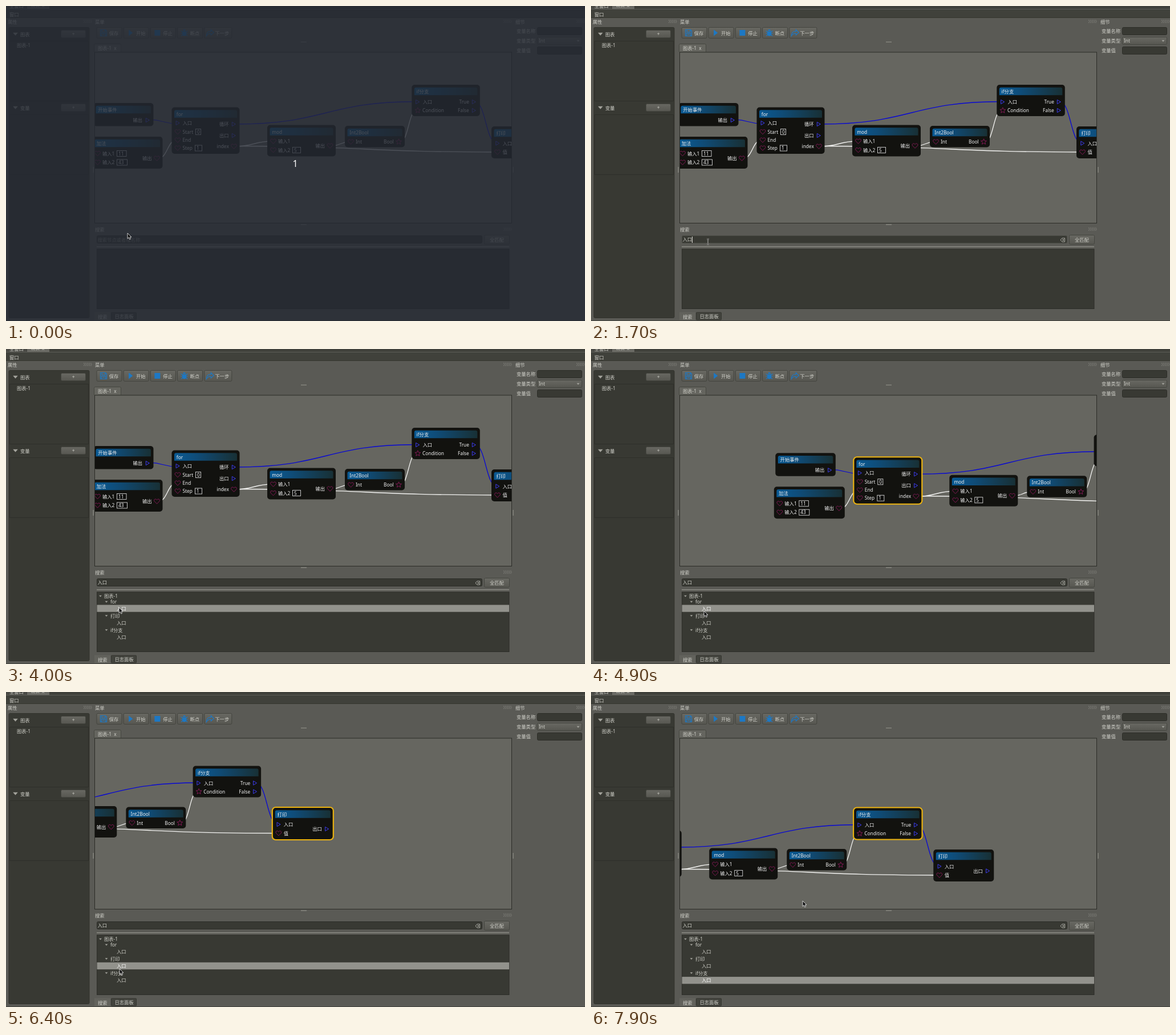
Write an HTML page that moves like this. It is 1015 px wide and 552 px high and loops after 8 s.

```html
<!DOCTYPE html>
<html lang="zh-CN">
<head>
<meta charset="utf-8">
<title>节点编辑器搜索</title>
<style>
html, body { margin: 0; width: 100%; height: 100%; overflow: hidden; background: #5a5a55; }
svg { display: block; width: 100vw; height: 100vh; }
text { font: 8.3px "Noto Sans", "Noto Sans CJK SC", "Noto Sans CJK", sans-serif; white-space: pre; }
</style>
</head>
<body>
<svg id="stage" viewBox="0 0 1015 552" xmlns="http://www.w3.org/2000/svg"></svg>
<script>
const UI = '#d2d2cb', DARK = '#383933', EDGE = '#2c2d28', ICON = '#1d78c4';

// y is the middle of the line of text
const text = (x, y, str, fill = UI, extra = '') =>
  `<text x="${x}" y="${y + 3}" fill="${fill}" ${extra}>${str}</text>`;
const rect = (x, y, w, h, fill, stroke = 'none', r = 0, extra = '') =>
  `<rect x="${x}" y="${y}" width="${w}" height="${h}" rx="${r}" fill="${fill}" stroke="${stroke}" ${extra}/>`;
const path = (d, fill, stroke = 'none', width = 1, extra = '') =>
  `<path d="${d}" fill="${fill}" stroke="${stroke}" stroke-width="${width}" ${extra}/>`;
const at = (x, y, body) => `<g transform="translate(${x} ${y})">${body}</g>`;

const button = (x, y, w, h) => rect(x + .5, y + .5, w - 1, h - 1, 'url(#btn)', '#44453f', 2);
const field = (x, y, w, h) => rect(x + .5, y + .5, w - 1, h - 1, DARK, EDGE, 2);
const arrowDown = (x, y, r, fill = '#a3a39c') =>
  path(`M${x - r} ${y - r / 2}h${2 * r}l${-r} ${r * 1.15}z`, fill);
const grip = x => [25, 27, 29].map((y, i) =>
  path(`M${x + i % 2} ${y}h14`, 'none', '#8b8b84', .9, 'stroke-dasharray="1.6 1.4"')).join('');

// Node graph ------------------------------------------------------------

const starPath = 'M' + Array.from({ length: 10 }, (_, i) => {
  const r = i % 2 ? 2.3 : 5.2, a = i * Math.PI / 5 - Math.PI / 2;
  return `${(r * Math.cos(a)).toFixed(2)} ${(r * Math.sin(a)).toFixed(2)}`;
}).join('L') + 'Z';
const marks = {
  run: path('M-2.7 -3.6L3.3 0L-2.7 3.6Z', 'none', '#3c3cf0', 1),
  heart: path('M0 4.3L-4.4 -.2C-5.7 -2.2 -4.2 -4 -2.5 -4C-1.2 -4 -.4 -3.2 0 -2.3C.4 -3.2 1.2 -4 2.5 -4C4.2 -4 5.7 -2.2 4.4 -.2Z', 'none', '#8d1a5c', .9),
  star: path(starPath, 'none', '#8d1a5c', .9)
};

// x, y, width, height, title, ports: [mark, x, y, label, label x, value, value x, value width]
const nodes = {
  start: [153, 170, 105.5, 40.5, '开始事件', [['run', 248, 200, '输出', 222.5]]],
  add: [150.5, 229, 124, 56, '加法', [
    ['heart', 160.5, 258.5, '输入1', 169, '11', 194, 17.5],
    ['heart', 160.5, 274, '输入2', 169, '43', 194, 19],
    ['heart', 264.5, 267, '输出', 239]]],
  loop: [290.5, 177.5, 119, 81.5, 'for', [
    ['run', 300.8, 205, '入口', 309.5], ['heart', 301, 220.5, 'Start', 309.5, '0', 332, 10],
    ['heart', 301, 235, 'End', 309.5], ['heart', 301, 249, 'Step', 309.5, '1', 331, 13],
    ['run', 399, 207, '循环', 374], ['run', 399, 227, '出口', 374], ['heart', 399.5, 246, 'index', 369.5]]],
  mod: [458, 208.5, 120, 55, 'mod', [
    ['heart', 468.5, 237, '输入1', 477],
    ['heart', 468.5, 252.5, '输入2', 477, '5', 502, 15],
    ['heart', 568, 245, '输出', 542.5]]],
  cast: [594, 210, 105, 37.5, 'Int2Bool', [['heart', 604.5, 238, 'Int', 613], ['star', 688.5, 238, 'Bool', 662]]],
  branch: [711.3, 138, 119.5, 55, 'if分支', [
    ['run', 721.3, 168, '入口', 730.5], ['star', 721.8, 183, 'Condition', 730],
    ['run', 820, 168, 'True', 794.5], ['run', 820, 183, 'False', 792]]],
  print: [851, 211, 106, 56, '打印', [
    ['run', 861.5, 240.5, '入口', 870.5], ['heart', 861.5, 256, '值', 870.5],
    ['run', 946, 248.5, '出口', 921]]]
};

const port = ([mark, x, y, label, lx, value, vx, vw]) =>
  at(x, y, marks[mark]) + text(lx, y, label, '#f2f2f2') +
  (value ? rect(vx + .5, y - 5, vw - 1, 10, '#0c0c0a', '#d8d8d8', 0, 'stroke-width=".9"') + text(vx + 3, y, value, '#f2f2f2') : '');
const node = ([x, y, w, h, title, ports]) =>
  rect(x, y, w, h, '#12120f', 'none', 5) +
  path(`M${x + 4.5} ${y + 18.2}v-10.5q0 -3 3 -3h${w - 15}q3 0 3 3v10.5z`, 'url(#head)') +
  text(x + 8.3, y + 12.2, title, '#f2f2f2') + ports.map(port).join('');

const wire = (x1, y1, x2, y2, color = '#f2f2f0') => {
  const mid = (x1 + x2) / 2;
  return path(`M${x1} ${y1}C${mid} ${y1} ${mid} ${y2} ${x2} ${y2}`, 'none', color, 1.3);
};
const BLUE = '#0808d4';
const wires = wire(250, 199, 299, 206, BLUE) + wire(402, 207, 720, 167.5, BLUE) +
  wire(822, 168, 860, 240, BLUE) + wire(267, 267, 299, 235) + wire(402, 246, 467, 237) +
  wire(402, 245.5, 860, 256) + wire(571, 245, 602, 238) + wire(691, 238, 720, 183);

// Window parts ----------------------------------------------------------

const defs = `<defs>
<linearGradient id="btn" x2="0" y2="1"><stop stop-color="#686862"/><stop offset="1" stop-color="#575751"/></linearGradient>
<linearGradient id="head"><stop stop-color="#0a5a94"/><stop offset=".35" stop-color="#0f4c78"/><stop offset="1" stop-color="#183035"/></linearGradient>
<clipPath id="view"><rect x="156" y="82" width="730" height="298"/></clipPath></defs>`;

const topBar = rect(0, 0, 1015, 21, '#40413b') + rect(0, 0, 36, 5, '#4a4a45') + rect(37, 0, 39, 5.5, '#6a6a64') +
  text(6, 0, '主窗口') + text(44, -1, 'test  x') + rect(0, 5, 1015, 1, '#5e5e58') + rect(0, 20, 1015, 1, '#35362f') +
  text(6, 14.5, '窗口');

const section = (y, name) => arrowDown(16.5, y, 4.3) + text(25, y + .5, name) + button(96, y - 7, 44, 14) +
  text(118, y, '+', UI, 'text-anchor="middle"') + rect(6.5, y + 12.5, 138, 105, DARK, '#2e2f2a');
const leftDock = text(3, 27.5, '属性') + grip(136) + rect(5, 37.5, 141, 509, DARK, '#32332d', 2) +
  section(49, '图表') + text(19, 69, '图表-1') + section(178, '变量');

const icons = [
  path('M-5.5 -5.5h9l2 2v9h-11z M-3 -5.5v4h6v-4 M-3.5 5.5v-5h7v5 M-2 2.5h4', 'none', ICON, 1.2),
  path('M-3 -5.5L4 0L-3 5.5Z', ICON),
  rect(-5, -5, 10, 10, ICON),
  path('M-2.5 -3.5a2.5 2.5 0 0 1 5 0z M-3.5 -2.6h7v4.6a3.5 3.5 0 0 1 -7 0z', ICON) +
    path('M-6 -3.5l3 2M6 -3.5l-3 2M-6.5 1h13M-5.5 5.5l3 -2.5M5.5 5.5l-3 -2.5', 'none', ICON, 1.2),
  path('M-6 5.5C-6 -1 -2 -3 2 -2.5V-5.5L7 -.5L2 4V1.2C-2 .5 -4 2 -6 5.5Z', 'none', ICON, 1.2)
];
const tools = ['保存', '开始', '停止', '断点', '下一步'].map((name, i) => {
  const x = 158.5 + 47.2 * i;
  return button(x, 37, i == 4 ? 49 : 45, 20) + at(x + (i == 4 ? 10 : 12.5), 47, icons[i]) +
    text(x + (i == 4 ? 19 : 22.3), 47.5, name);
}).join('');

const handles = rect(517, 62.5, 10, 1.2, '#8e8e87') + rect(517, 382.5, 10, 1.2, '#8e8e87') +
  rect(152.5, 282, 1.2, 10, '#8e8e87') + rect(888.5, 282, 1.2, 10, '#8e8e87');

const centre = text(156, 27.5, '菜单') + grip(872) + tools + handles +
  path('M154.5 80.5v-12q0 -2 2 -2h43q2 0 2 2v12', '#65655f', '#45463f') + text(161, 73.5, '图表-1  x') +
  rect(155.5, 81, 731, 299.5, '#666660', '#2b2c27');

const rightDock = text(893, 27.5, '细节') + grip(1000) +
  ['变量名称', '变量类型', '变量值'].map((s, i) => text(895, 44.3 + 17 * i, s)).join('') +
  field(931, 37, 79, 14) + button(931, 54, 79, 14) + field(931, 71, 79, 14) +
  text(934, 61, 'Int') + arrowDown(1003, 61, 2.6);

const searchDock = text(156, 391.5, '搜索') + at(0, 364, grip(872)) +
  rect(159.5, 402.5, 675, 13, DARK, EDGE, 2, 'id="box"') + button(838, 401, 45, 17) + text(848, 409.5, '全匹配') +
  rect(159, 421, 723, 1.5, '#8a8a83') + rect(159.5, 426, 722.5, 104.5, DARK, EDGE) +
  path('M155 536.5h28v14h-28z', '#62625c') + text(161, 544.5, '搜索') +
  rect(184.5, 537, 44, 13, '#42433d', '#34352f', 1) + text(190.5, 544, '日志面板') + rect(0, 551, 1015, 1, '#42433d');

const ROWS = [454.6, 480, 505.3];
const tree = `<g id="tree">` + rect(159.5, 0, 722.5, 12.3, '#92928c', 'none', 0, 'id="sel"') +
  arrowDown(165.5, 433, 2.4) + text(172, 433, '图表-1') +
  [[443, 'for'], [467.5, '打印'], [492.5, 'if分支']].map(([y, s]) => arrowDown(176, y, 2.4) + text(183, y, s)).join('') +
  ROWS.map(y => text(194, y, '入口', UI, 'class="hit"')).join('') + '</g>';

const entry = text(160.5, 409.5, '搜索节点或者槽名称', '#8d8d86', 'id="hint"') +
  text(160.5, 409.3, '入口', UI, 'id="query"') + rect(177, 404, 1, 11, '#e4e4de', 'none', 0, 'id="caret"') +
  `<g id="clear">${path('M823 410l2.8 -3.2h4.8v6.4h-4.8z M826.5 408.3l2.8 3.4m0 -3.4l-2.8 3.4', 'none', '#c4c4bd', .8)}</g>`;

const overlay = `<g id="shade">${rect(0, 0, 1015, 552, '#242932', 'none', 0, 'opacity=".8"')}
<text x="507" y="282" fill="#fff" text-anchor="middle" style="font-size:16px">1</text></g>`;

const pointers = `<g id="arrow">${path('M0 0V9.6L2.2 7.6L3.8 11L5.5 10.2L4 7H7Z', '#111', '#f4f4f4', .8)}</g>` +
  `<g id="beam">${path('M-2 -4.5q2 0 2 1q0 -1 2 -1M0 -3.5v7M-2 4.5q2 0 2 -1q0 1 2 1', 'none', '#e0e0da', 1.8)}${
    path('M-2 -4.5q2 0 2 1q0 -1 2 -1M0 -3.5v7M-2 4.5q2 0 2 -1q0 1 2 1', 'none', '#111', .9)}</g>`;

const stage = document.getElementById('stage');
stage.innerHTML = defs + rect(0, 0, 1015, 552, '#5a5a55') + topBar + leftDock + centre +
  `<g clip-path="url(#view)"><g id="graph">${wires}${Object.values(nodes).map(node).join('')}${
    rect(0, 0, 0, 0, 'none', '#ebb210', 6, 'id="ring" stroke-width="2.2"')}</g></g>` +
  rightDock + searchDock + tree + entry + overlay + pointers;

// Motion ----------------------------------------------------------------

const el = id => document.getElementById(id);
const show = (id, on) => el(id).setAttribute('visibility', on ? 'visible' : 'hidden');
const set = (id, attrs) => { for (const k in attrs) el(id).setAttribute(k, attrs[k]); };
const hits = [...document.querySelectorAll('.hit')];
const LOOP = 8000, STEP = 100;

const trail = [
  [0, 213, 398], [100, 214, 399], [400, 205, 413], [3400, 205, 413], [3900, 198, 453],
  [4800, 198, 453], [4900, 198, 459], [5400, 199, 479], [6300, 199, 479],
  [6400, 199, 485], [6900, 201, 503], [7400, 201, 503], [7900, 371, 366]
];
const pointerAt = t => {
  const i = trail.findIndex(p => p[0] >= t);
  if (i < 1) return trail[0].slice(1);
  const [t0, x0, y0] = trail[i - 1], [t1, x1, y1] = trail[i], k = (t - t0) / (t1 - t0);
  return [x0 + (x1 - x0) * k, y0 + (y1 - y0) * k];
};
const countPast = (t, times) => times.filter(s => t >= s).length;

function draw(ms) {
  const t = Math.floor(ms % LOOP / STEP) * STEP;
  const typed = t >= 1400, focused = t >= 800 && t < 4000;

  show('shade', t < 100);
  show('hint', !typed);
  show('query', typed);
  set('clear', { opacity: Math.min(1, Math.max(0, (t - 1300) / 300)) });
  set('caret', { x: typed ? 177 : 161 });
  show('caret', focused && (t < 2300 || t >= 2700 && t < 3300));
  set('box', { stroke: focused ? '#4c4d47' : EDGE });

  show('tree', t >= 2600);
  const row = countPast(t, [4000, 5500, 7000]) - 1;
  show('sel', row >= 0);
  if (row >= 0) set('sel', { y: ROWS[row] - 6.2 });
  hits.forEach((h, i) => h.setAttribute('fill', i === row ? '#fff' : UI));

  // the chosen node is centred in the view
  const focus = [null, nodes.loop, nodes.print, nodes.branch][countPast(t, [4200, 5700, 7200])];
  show('ring', focus);
  let shift = [0, 0];
  if (focus) {
    const [x, y, w, h] = focus;
    shift = [520.3 - x - w / 2, 230.5 - y - h / 2];
    set('ring', { x: x - .5, y: y - .5, width: w + 1, height: h + 1 });
  }
  set('graph', { transform: `translate(${shift})` });

  const [px, py] = pointerAt(t), beam = t >= 100 && py < 417 && t < 4000;
  show('arrow', !beam);
  show('beam', beam);
  set(beam ? 'beam' : 'arrow', { transform: `translate(${px} ${py})` });
}

const begin = performance.now();
const tick = () => {
  draw(performance.now() - begin);
  requestAnimationFrame(tick);
};
tick();
</script>
</body>
</html>
```
